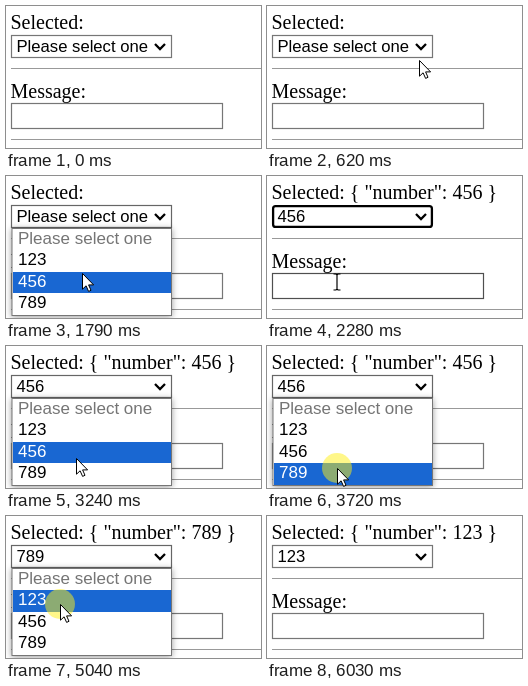
Write an HTML page that moves like this. It is 255 px wide and 142 px high and loops after 6160 ms.

```html
<!DOCTYPE html>
<html lang="en">
<head>
<meta charset="utf-8">
<title>Select demo</title>
<style>
  html, body { margin: 0; width: 100%; height: 100%; overflow: hidden; background: #fff; }
  svg { display: block; width: 100%; height: 100%; }
  text { white-space: pre; }
  .serif { font: 20px "Liberation Serif", "Times New Roman", serif; }
  .sans { font: 16.67px "Liberation Sans", Arial, sans-serif; }
  #popup .sans { font-size: 17px; }
  .shadow { filter: drop-shadow(0 1px 3px rgba(0, 0, 0, .4)); }
</style>
</head>
<body>
<svg viewBox="0 0 255 142">
  <text class="serif" id="title" x="4.5" y="23"></text>
  <rect id="select" fill="#fff"/>
  <text class="sans" id="value" x="10.5" y="46"></text>
  <path d="M149 38l5 5 5-5" fill="none" stroke="#000" stroke-width="2.3"/>
  <path d="M5 62.5H255M5 133.5H255" stroke="#999"/>
  <text class="serif" x="4.5" y="92">Message:</text>
  <rect id="input" x="5.5" y="97.5" width="211" height="25" fill="#fff" stroke-width="1.2"/>
  <g id="popup">
    <rect class="shadow" x="6" y="52.5" width="159.5" height="87" fill="#fff" stroke="#767676"/>
    <rect id="bar" x="7" width="158"/>
  </g>
  <circle id="click" r="15" fill="#fff014"/>
  <path id="arrow" d="M.5.5V16.2L4.1 12.8 6.6 18.4 9 17.3 6.6 11.9H11.6Z" fill="#fff" stroke="#000"/>
  <g id="beam" fill="none">
    <path d="M-3.5-8H-1L0-7 1-8H3.5M0-7V7M-3.5 8H-1L0 7 1 8H3.5" stroke="#000" stroke-width="1.2"/>
  </g>
</svg>
<script>
const LOOP = 6160;
const ROW_TOP = 53, ROW_H = 21.4;
const OPTIONS = ["Please select one", "123", "456", "789"];
const $ = id => document.getElementById(id);

const inOut = p => p * p * (3 - 2 * p);
const out = p => 1 - (1 - p) ** 3;

// first step, last step, number of steps, target, easing
const MOVES = [
  [260, 830, 9, [122, 38], inOut],
  [1370, 1930, 9, [69.5, 106], inOut],
  [2480, 2760, 5, [72, 45], inOut],
  [2960, 3590, 10, [70, 122], out],
  [3860, 4280, 7, [86, 39], inOut],
  [4480, 4890, 7, [54, 88], inOut],
  [5170, 5170, 1, [56.5, 82], inOut],
  [5370, 5500, 3, [243, 120], inOut]
];
const ENTRY = [237, 101];
const VISIBLE = [[260, 5570]];
// pale from, strong from, gone
const CLICKS = [
  [1030, 1100, 1170], [2130, 2210, 2280], [2830, 2890, 2960],
  [3720, 3790, 3860], [4340, 4410, 4480], [5040, 5170, 5170]
];
const OPEN = [[1100, 2210], [2890, 3790], [4340, 5170]];
const FOCUS = [[2210, 6030]];
const PICKS = [[2210, 2], [3790, 3], [5170, 1]];

const during = (spans, t) => spans.some(([a, b]) => t >= a && t < b);
const inside = ([x, y], x0, y0, x1, y1) => x >= x0 && x < x1 && y >= y0 && y < y1;
const rowTop = i => Math.round(ROW_TOP + i * ROW_H);
const show = (el, on) => el.style.display = on ? "" : "none";
const set = (el, attrs) => {
  for (const k in attrs) el.setAttribute(k, attrs[k]);
};

const rows = OPTIONS.map((label, i) => {
  const el = document.createElementNS("http://www.w3.org/2000/svg", "text");
  set(el, { class: "sans", x: 12, y: rowTop(i) + 15 });
  el.textContent = label;
  $("popup").append(el);
  return el;
});

function cursorAt(t) {
  let pos = ENTRY;
  for (const [start, end, steps, to, ease] of MOVES) {
    if (t < start) break;
    const gap = (end - start) / Math.max(1, steps - 1) || 1;
    const step = Math.min(steps, Math.floor((t - start) / gap + 1e-6) + 1);
    const p = ease(step / steps);
    pos = pos.map((v, i) => v + (to[i] - v) * p);
  }
  return pos;
}

function clickOpacity(t) {
  const click = CLICKS.find(([start, , end]) => t >= start && t < end);
  return click ? (t < click[1] ? .5 : .75) : 0;
}

function drawPopup(y, picked) {
  const hover = Math.min(3, Math.floor((y - ROW_TOP) / ROW_H));
  const active = hover > 0 ? hover : picked;
  set($("bar"), {
    y: rowTop(active),
    height: rowTop(active + 1) - rowTop(active),
    fill: active ? "#1967d2" : "#c3c3c3"
  });
  rows.forEach((el, i) => set(el, {
    fill: i === active ? "#fff" : i ? "#000" : "#757575"
  }));
}

function draw(t) {
  const pos = cursorAt(t);
  const visible = during(VISIBLE, t);
  const open = during(OPEN, t);
  const focus = during(FOCUS, t) && !open;
  const picked = PICKS.reduce((v, [at, i]) => t >= at ? i : v, 0);
  const free = visible && !open;
  const overSelect = free && inside(pos, 5, 29, 166, 52);
  const overInput = free && inside(pos, 5, 97, 217, 123);
  const overLabel = free && inside(pos, 5, 75, 80, 97);
  const beam = overInput || overLabel;

  $("title").textContent = "Selected:" + (picked ? ` { "number": ${OPTIONS[picked]} }` : "");
  $("value").textContent = OPTIONS[picked];
  set($("select"), focus
    ? { x: 6.1, y: 30.1, width: 158.8, height: 20.8, rx: 2.5, stroke: "#000", "stroke-width": 2.3 }
    : { x: 5.5, y: 29.5, width: 160, height: 22, rx: 0,
        stroke: overSelect ? "#4f4f4f" : open ? "#666" : "#767676", "stroke-width": 1.2 });
  set($("input"), { stroke: overInput ? "#4f4f4f" : "#767676" });

  show($("popup"), open);
  if (open) drawPopup(pos[1], picked);

  const place = { transform: `translate(${pos.map(v => Math.round(v))})` };
  set($("click"), { "fill-opacity": clickOpacity(t) });
  show($("arrow"), visible && !beam);
  show($("beam"), beam);
  for (const id of ["click", "arrow", "beam"]) set($(id), place);
}

const origin = performance.now();
function tick() {
  draw((performance.now() - origin) % LOOP);
  requestAnimationFrame(tick);
}
tick();
</script>
</body>
</html>
```
